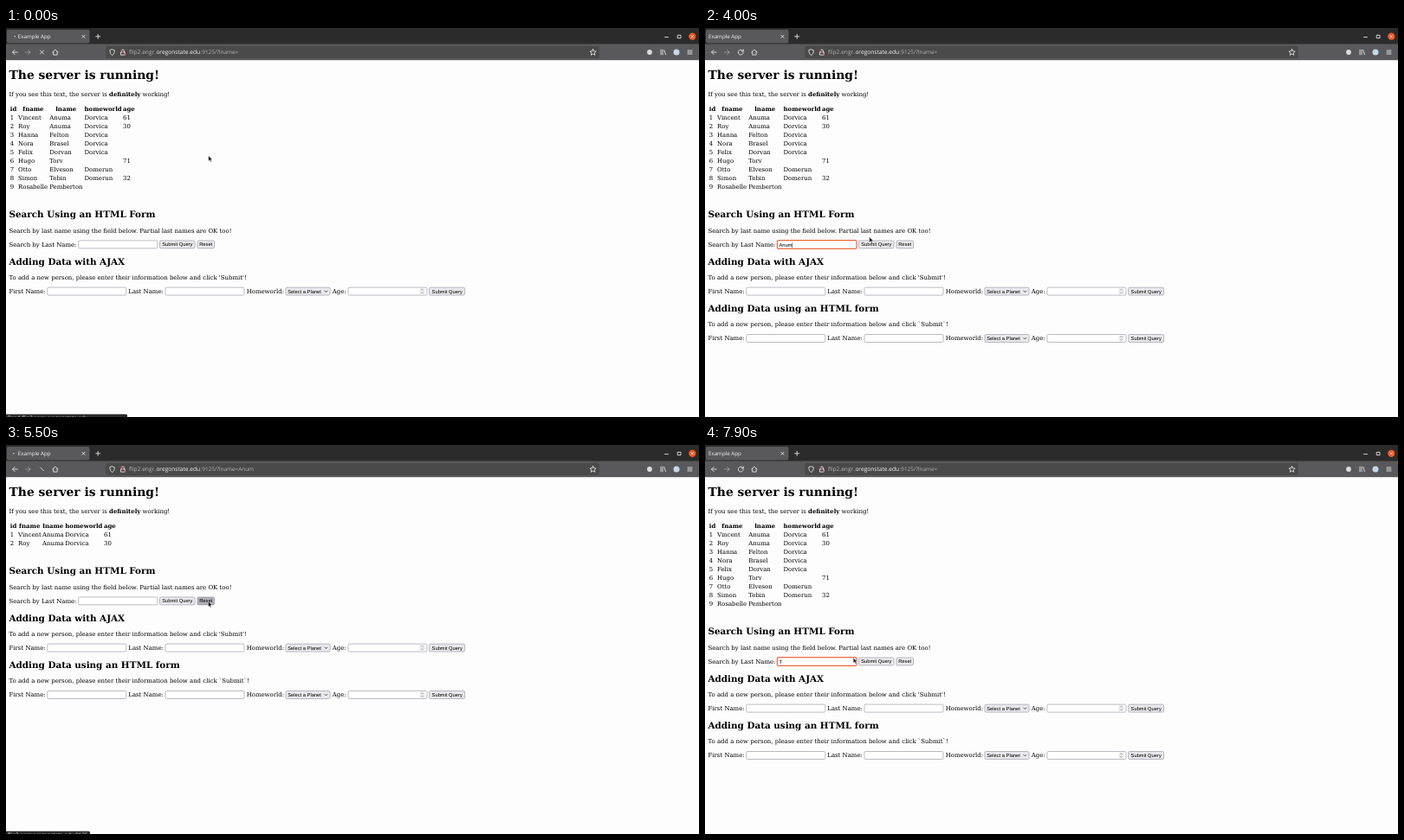
Write an HTML page that moves like this. It is 800x450 px and loops after 8000 ms.

```html
<!DOCTYPE html>
<html lang="en">
<head>
<meta charset="utf-8">
<title>Example App</title>
<style>
  html, body { margin: 0; width: 100%; height: 100%; overflow: hidden; background: #fefdfe; }
  svg { display: block; width: 800px; height: 450px; text-rendering: geometricPrecision; }
  text { white-space: pre; }
  .page { font: 6.95px "DejaVu Serif", serif; fill: #000; }
  .bold { font-weight: bold; }
  .h1 { font-size: 13.86px; font-weight: bold; }
  .h2 { font-size: 10.39px; font-weight: bold; }
  .ctl { font: 5.75px "Liberation Sans", Arial, sans-serif; }
  .ui { font: 6.2px "Open Sans", sans-serif; fill: #f4f4f4; }
  .ui.host { font-size: 6.6px; }
  .ui.query { font-size: 6.4px; }
  .ui.dim { fill: #b4b4b4; }
  .icon { fill: none; stroke: #e4e4e4; stroke-width: .9; stroke-linecap: round; stroke-linejoin: round; }
</style>
</head>
<body>
<svg id="stage" viewBox="0 0 800 450"></svg>
<script>
const LOOP = 8000;
const stage = document.getElementById('stage');

const people = [
  ['Vincent', 'Anuma', 'Dorvica', 61], ['Roy', 'Anuma', 'Dorvica', 30],
  ['Hanna', 'Felton', 'Dorvica', ''], ['Nora', 'Brasel', 'Dorvica', ''],
  ['Felix', 'Dorvan', 'Dorvica', ''], ['Hugo', 'Torv', '', 71],
  ['Otto', 'Elveson', 'Domerun', ''], ['Simon', 'Tebin', 'Domerun', 32],
  ['Rosabelle', 'Pemberton', '', '']
];
const query = 'Anum';

// Each load: request sent, new body shown, body complete, burst in the tab
const loads = [
  { start: -400, body: -100, full: 100, done: 300, bar: 140 },
  { start: 4250, body: 4400, full: 4600, done: 4700, bar: 140 },
  { start: 5400, body: 5600, full: 5650, done: 5700, bar: 97 }
];
const focusSpans = [[1000, 4200], [6500, LOOP]];
const keys = [
  [1000, ''], [1500, 'A'], [2800, 'An'], [3200, 'Anu'], [3600, query],
  [6500, ''], [7200, 'T']
];
const clicks = [[4200, 4350], [5350, 5590]];
const pointerPath = [
  [0, 233.7, 147.7], [100, 233.7, 147.7], [900, 120.3, 245.6], [3750, 120.3, 245.6],
  [4000, 189.7, 241.7], [4200, 188.6, 251], [4700, 188.6, 251],
  [5250, 233.5, 180.8], [5750, 233.3, 181], [6300, 171.2, 246], [LOOP, 171.2, 246]
];

const within = (t, [a, b]) => t >= a && t < b;
const text = (x, y, s, cls = '', extra = '') => `<text x="${x}" y="${y}" class="${cls}" ${extra}>${s}</text>`;
const mid = (x, y, s, cls) => text(x, y, s, cls, 'text-anchor="middle"');
const rect = (x, y, w, h, fill, r = 0, extra = '') =>
  `<rect x="${x}" y="${y}" width="${w}" height="${h}" rx="${r}" fill="${fill}" ${extra}/>`;
const circle = (x, y, r, fill, extra = '') => `<circle cx="${x}" cy="${y}" r="${r}" fill="${fill}" ${extra}/>`;
const icon = (d, extra = '') => `<path class="icon" d="${d}" ${extra}/>`;

function pointerAt(t) {
  const i = pointerPath.findIndex(p => p[0] > t);
  const [t0, x0, y0] = pointerPath[i - 1], [t1, x1, y1] = pointerPath[i];
  const k = (t - t0) / (t1 - t0), e = k * k * (3 - 2 * k);
  return [x0 + (x1 - x0) * e, y0 + (y1 - y0) * e];
}

function stateAt(t) {
  const load = loads.filter(l => t >= l.start).pop();
  const [keyTime, typed] = keys.filter(k => t >= k[0]).pop() || [0, ''];
  return {
    load,
    loading: t < load.done,
    filtered: t >= loads[1].body && t < loads[2].body,
    partial: t >= load.body && t < load.full,
    focused: focusSpans.some(s => within(t, s)),
    pressed: clicks.some(s => within(t, s)),
    typed: t >= loads[1].body && t < 6500 ? '' : typed,
    caret: (t - keyTime) % 1000 < 500,
    pointer: pointerAt(t)
  };
}

function button(x, base, w, label, s) {
  const y = base - 6.9, [px, py] = s.pointer;
  const over = px > x && px < x + w && py > y && py < y + 9;
  const fill = over ? (s.pressed ? '#b1b1b9' : '#d0d0d7') : '#e9e9ed';
  return rect(x, y, w, 9, fill, 1.5, 'stroke="#8f8f9d" stroke-width=".6"') +
    mid(x + w / 2, base - .35, label, 'ctl');
}

const field = (x, base) =>
  rect(x, base - 6.9, 91, 9, '#fff', 1.3, 'stroke="#8f8f9d" stroke-width=".6"');

function table(s) {
  const [first, last, world, age] = s.filtered ? [14, 42, 68.3, 113] : [14, 50.2, 90.5, 135];
  const rows = s.filtered ? people.filter(p => p[1].startsWith(query)) : people;
  let out = mid(8.6, 95.9, 'id', 'bold') + mid(s.filtered ? 27.2 : 31.3, 95.9, 'fname', 'bold') +
    mid(s.filtered ? 54.3 : 69.2, 95.9, 'lname', 'bold') +
    text(world, 95.9, 'homeworld', 'bold') + text(age, 95.9, 'age', 'bold');
  rows.forEach((p, i) => {
    const y = 105.9 + 10 * i;
    out += text(4.7, y, i + 1);
    [first, last, world, age].forEach((x, c) => out += text(x, y, p[c]));
  });
  return out;
}

function searchForm(s) {
  const y = 252.8;
  let out = text(3.5, 219.1, 'Search Using an HTML Form', 'h2') +
    text(3.5, 236.6, 'Search by last name using the field below. Partial last names are OK too!') +
    text(3.5, y, 'Search by Last Name:') + field(83.7, y) +
    button(177.5, y, 40.6, 'Submit Query', s) + button(220.9, y, 19.6, 'Reset', s);
  if (s.focused) {
    out += rect(83.4, y - 7.2, 91.6, 9.7, '#fff', 1.4, 'stroke="#ec6a40" stroke-width="1.2"');
  }
  const caret = s.focused && s.caret ? '<tspan dx="-.4" font-size="6.6">|</tspan>' : '';
  return out + text(85.4, y - .3, s.typed + caret, 'ctl');
}

function addForm(y, title, quotes, s) {
  const [q1, q2] = quotes, base = y + 33.5;
  return text(3.5, y, title, 'h2') +
    text(3.5, y + 17.5, `To add a new person, please enter their information below and click ${q1}Submit${q2}!`) +
    text(3.5, base, 'First Name:') + field(47.8, base) +
    text(141.3, base, 'Last Name:') + field(184, base) +
    text(277.7, base, 'Homeworld:') + button(322.9, base, 51.2, '', s) +
    text(325.2, base - .35, 'Select a Planet', 'ctl') +
    `<path d="M367.7 ${base - 3.2}l1.7 1.7 1.7-1.7" fill="none" stroke="#222" stroke-width=".8"/>` +
    text(376.8, base, 'Age:') + field(395, base) +
    rect(477.5, base - 6, 6, 7.2, '#ededf0', 1) +
    `<path d="M479.1 ${base - 3.4}l1.4-1.4 1.4 1.4M479.1 ${base - 1.4}l1.4 1.4 1.4-1.4" fill="none" stroke="#777" stroke-width=".6"/>` +
    button(488.7, base, 41, 'Submit Query', s);
}

function forms(s) {
  // Hit tests happen in form coordinates
  const shift = s.filtered ? 70 : 0;
  const local = { ...s, pointer: [s.pointer[0], s.pointer[1] + shift] };
  return `<g transform="translate(0 ${-shift})">` + searchForm(local) +
    addForm(273.5, 'Adding Data with AJAX', "''", local) +
    (s.partial ? '' : addForm(327.9, 'Adding Data using an HTML form', '``', local)) + '</g>';
}

function page(s) {
  return '<g class="page">' + text(3.5, 59, 'The server is running!', 'h1') +
    text(3.5, 79.2, 'If you see this text, the server is <tspan class="bold">definitely</tspan> working!') +
    table(s) + forms(s) + '</g>';
}

function tab(s, t) {
  const hostTitle = s.partial && s.load !== loads[0];
  const label = hostTitle ? 'flip2.engr.oregonstate.edu' : 'Example App';
  const age = (t - s.load.done) / 450;
  let out = rect(1, 2, 95.5, 15.5, '#59595b', 2);
  if (age >= 0 && age < 1) {
    out += circle(15, 10, 13 + 30 * age, '#2466b0', `opacity="${.8 * (1 - age)}" clip-path="url(#tab)"`);
  }
  if (s.loading) out += circle(9.6 + .7 * Math.cos(t / 160), 9.8, .8, '#d5d5d5');
  return out + text(s.loading ? 13.8 : 4, 12.1, label, 'ui') +
    icon('M88 8.3l3 3m0-3l-3 3') + icon('M103.7 9.8h5m-2.5-2.5v5');
}

function reloadIcon(s, t) {
  if (within(t, [5450, 5600])) return icon('M39.7 26l3.8 3.8');
  if (s.loading) return icon('M39.5 26l4 4m0-4l-4 4');
  const age = t - s.load.done;
  if (age < 200) return icon('M39.5 26l4 4m0-4l-4 4', 'opacity=".4"');
  return icon('M44.2 28.4a2.9 2.9 0 1 1-.9-2.4l1 1m0-2.1v2.1h-2.1', age < 600 ? 'opacity=".4"' : '');
}

function browser(s, t) {
  return rect(0, 0, 800, 19, '#2b2b2b') + tab(s, t) +
    icon('M760.6 10.6h3.8') + icon('M775.6 8.3h3.4v3.4h-3.4z') +
    circle(792.3, 9.8, 4.2, '#e95420') + icon('M790.9 8.4l2.8 2.8m0-2.8l-2.8 2.8') +
    rect(0, 18.5, 800, 18.7, '#59595b') + rect(115.3, 21, 569.5, 14, '#4a4a4a', 2) +
    icon('M13.2 28H7.6m2.6-2.7L7.5 28l2.7 2.7') +
    icon('M22.4 28H28m-2.6-2.7l2.7 2.7-2.7 2.7', 'opacity=".45"') + reloadIcon(s, t) +
    icon('M53.7 28l3.2-3 3.2 3m-5.4-.7v3.8h4.4v-3.8') +
    icon('M122.6 24.8l2.7 1c0 3-.7 4.6-2.7 5.7-2-1.1-2.7-2.7-2.7-5.7z') +
    icon('M132.8 27.8h4.4v3.3h-4.4zm.8 0v-1.4a1.4 1.4 0 0 1 2.8 0v1.4') +
    '<path d="M132 25l6 6.5" stroke="#e22850" stroke-width=".9"/>' +
    text(142, 30.2, 'flip2.engr.', 'ui host dim') + text(173.4, 30.2, 'oregonstate.edu', 'ui host') +
    text(224.6, 30.2, ':9125/?lname=', 'ui query dim') +
    (s.filtered ? text(268.2, 30.2, query, 'ui query dim') : '') +
    icon('M677.6 24.5l1.1 2.3 2.5.3-1.9 1.7.5 2.5-2.2-1.3-2.2 1.3.5-2.5-1.9-1.7 2.5-.3z') +
    circle(743, 28, 2.9, '#dcdcdc') + icon('M756 25.2v5.6m2-5.6v5.6m1.8-5.4l1.7 5.4') +
    circle(774, 28, 3.5, '#c3d8e8') + icon('M787 26h5m-5 2h5m-5 2h5');
}

function statusBar(s, t) {
  if (t < s.load.start || t >= s.load.full) return '';
  const host = 'flip2.engr.oregonstate.edu';
  const label = s.load.bar > 100 ? 'Read ' + host : host + ':9125';
  return rect(-2, 446.7, s.load.bar + 2, 8, '#2b2b2b', 1.5) + text(2, 453.1, label, 'ui');
}

function pointer([x, y]) {
  return `<path transform="translate(${x} ${y})" d="M0 0v6.3l1.5-1.3 1 2.2 1.1-.5-1-2.1h2z" fill="#111" stroke="#fff" stroke-width=".45"/>`;
}

function draw(t) {
  const s = stateAt(t);
  stage.innerHTML = '<clipPath id="tab"><rect x="1" y="2" width="95.5" height="15.5" rx="2"/></clipPath>' +
    rect(0, 0, 800, 450, '#fefdfe') + page(s) + browser(s, t) + statusBar(s, t) + pointer(s.pointer);
}

const begin = performance.now();
function frame() {
  draw((performance.now() - begin) % LOOP);
  requestAnimationFrame(frame);
}
frame();
</script>
</body>
</html>
```
